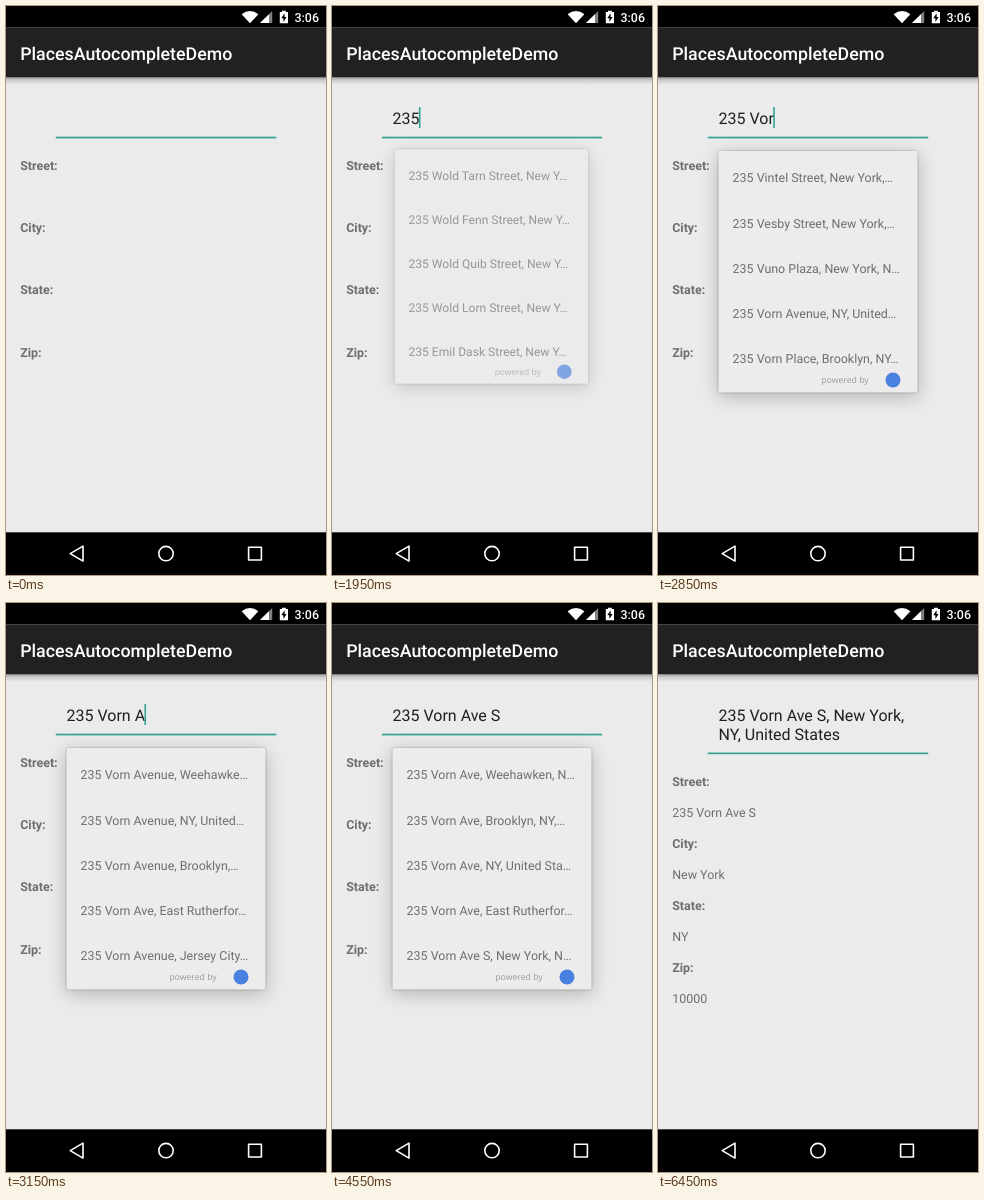
An HTML page for the animation above (6.5 s loop, 320 by 569 pixels).

```html
<!DOCTYPE html>
<html lang="en">
<head>
<meta charset="utf-8">
<title>Autocomplete demo</title>
<style>
  html, body { margin: 0; width: 100%; height: 100%; overflow: hidden; background: #ebebeb; }
  svg { display: block; width: 100vw; height: 100vh; }
  text {
    font-family: Roboto, sans-serif; font-size: 12.44px; fill: #6e6e6e;
    white-space: pre; text-rendering: geometricPrecision;
  }
  .title { font-size: 17.78px; font-weight: 500; fill: #fff; }
  .clock { font-weight: 500; fill: #fff; text-anchor: end; }
  .label { font-weight: 700; }
  .input { font-size: 16px; fill: #1f1f1f; }
  .credit { font-family: "Open Sans", sans-serif; font-size: 8.7px; fill: #9a9a9a; }
  .card { fill: #ececec; filter: drop-shadow(0 0 1px rgba(0,0,0,.3)) drop-shadow(0 4px 9px rgba(0,0,0,.24)); }
  .accent { fill: #34a393; }
  .nav { fill: none; stroke: #fff; stroke-width: 1.6; stroke-linejoin: round; }
</style>
</head>
<body>
<svg viewBox="0 0 320 569">
  <defs>
    <linearGradient id="shade" x2="0" y2="1">
      <stop offset="0" stop-opacity=".36"/>
      <stop offset=".4" stop-opacity=".13"/>
      <stop offset="1" stop-opacity="0"/>
    </linearGradient>
  </defs>
  <rect width="320" height="569" fill="#ebebeb"/>

  <rect y="71" width="320" height="8" fill="url(#shade)"/>
  <rect y="21.5" width="320" height="49.7" fill="#212121"/>
  <rect width="320" height="21.5"/>
  <text class="title" x="14.2" y="53.7">PlacesAutocompleteDemo</text>
  <g fill="#fff">
    <path d="M235.6 8.2Q244 1.8 252.4 8.2L244 17.2Z"/>
    <path d="M266.2 5V17H254Z" opacity=".5"/>
    <path d="M263 8.2V17H254Z"/>
    <path d="M276 6V4.8H279.8V6H282V17.2H273.8V6Z"/>
  </g>
  <path d="M278.6 7.2L275.3 12.2H277.4V16L280.6 11H278.6Z"/>
  <text class="clock" x="313" y="16">3:06</text>

  <g id="field">
    <text class="input" id="line1" x="60.5" y="118"></text>
    <text class="input" id="line2" x="60.5" y="136.7"></text>
    <rect class="accent" id="underline" x="49.8" width="220.4" height="1.7"/>
    <rect class="accent" id="cursor" width="1.6" height="21"/>
  </g>
  <g id="form"></g>

  <g id="popup">
    <rect class="card" x="60.5" y="145" width="199" height="241.5" rx="1.8"/>
    <g id="rows"></g>
    <text class="credit" x="163.3" y="377">powered by</text>
    <circle cx="235" cy="374" r="7.5" fill="#4a80e0"/>
  </g>

  <rect y="526.3" width="320" height="42.7"/>
  <g class="nav">
    <path d="M77 540.1V555.1L64.2 547.6Z"/>
    <circle cx="160" cy="547.6" r="7.2"/>
    <rect x="242.6" y="541.2" width="12.8" height="12.8"/>
  </g>
</svg>
<script>
const LOOP = 6500, STEP = 50, BLINK = 250;
const SHIFT = 18.8, LEFT = 60.5;
const QUERY = "235 Vorn Ave S";
const KEYS = [1450, 1600, 1750, 2150, 2250, 2650, 2850, 2950, 3000, 3050, 3450, 3500, 3600, 3650];
const FOCUS = 150, PICK = 4700, DETAILS = 5200;
const POP_IN = 1850, POP_IN_LEN = 150, POP_OUT_LEN = 150;

const LISTS = [
  [1850, ["Wold Tarn Street, New Y…", "Wold Fenn Street, New Y…", "Wold Quib Street, New Y…",
          "Wold Lorn Street, New Y…", "Emil Dask Street, New Y…"]],
  [2300, ["Vintel Street, New York,…", "Vesby Street, New York,…", "Vuno Plaza, New York, N…",
          "Vorn Avenue, NY, United…", "Vorn Place, Brooklyn, NY…"]],
  [3100, ["Vorn Avenue, Weehawke…", "Vorn Avenue, NY, United…", "Vorn Avenue, Brooklyn,…",
          "Vorn Ave, East Rutherfor…", "Vorn Avenue, Jersey City…"]],
  [3750, ["Vorn Ave, Weehawken, N…", "Vorn Ave, Brooklyn, NY,…", "Vorn Ave, NY, United Sta…",
          "Vorn Ave, East Rutherfor…", "Vorn Ave S, New York, N…"]]
];
const FORM = [["Street:", QUERY], ["City:", "New York"], ["State:", "NY"], ["Zip:", "10000"]];

const $ = id => document.getElementById(id);
const clamp = v => Math.min(1, Math.max(0, v));

function addText(parent, x, y, text, cls = "") {
  const el = document.createElementNS("http://www.w3.org/2000/svg", "text");
  el.setAttribute("x", x);
  el.setAttribute("y", y);
  el.setAttribute("class", cls);
  el.textContent = text;
  parent.append(el);
  return el;
}

function setText(el, text) {
  if (el.textContent !== text) el.textContent = text;
}

const values = FORM.map(([label, value], i) => {
  const y = 164 + i * 62.2;
  addText($("form"), 14.2, y, label, "label");
  return addText($("form"), 14.2, y + 31.1, value);
});
const rows = [0, 1, 2, 3, 4].map(i => addText($("rows"), 74.6, 176.4 + i * 45.25, ""));

function drawField(t) {
  const picked = t >= PICK;
  const typed = QUERY.slice(0, KEYS.filter(k => k <= t).length);
  setText($("line1"), picked ? QUERY + ", New York," : typed);
  setText($("line2"), picked ? "NY, United States" : "");
  $("underline").setAttribute("y", 130.7 + (picked ? SHIFT : 0));
  $("form").setAttribute("transform", `translate(0 ${picked ? SHIFT : 0})`);
  values.forEach(v => v.style.display = t >= DETAILS ? "" : "none");

  // Every edit restarts the blink
  const edit = Math.max(FOCUS, ...[...KEYS, PICK].filter(k => k <= t));
  const on = t >= edit && Math.floor((t - edit) / BLINK) % 2 === 0;
  const line = picked ? $("line2") : $("line1");
  const width = line.textContent ? line.getComputedTextLength() : 0;
  $("cursor").setAttribute("x", LEFT + width - 0.6);
  $("cursor").setAttribute("y", picked ? 120.5 : 101);
  $("cursor").style.display = on ? "" : "none";
}

function drawPopup(t) {
  const p = clamp((t - POP_IN) / POP_IN_LEN);
  const alpha = p * (1 - clamp((t - PICK) / POP_OUT_LEN));
  const popup = $("popup");
  popup.style.display = alpha > 0 ? "" : "none";
  popup.style.opacity = alpha;
  const s = 0.915 + 0.085 * p;
  popup.setAttribute("transform", `translate(140 80) scale(${s}) translate(-140 -80)`);
  const list = LISTS.filter(([start]) => start <= t).pop();
  if (list) list[1].forEach((text, i) => setText(rows[i], "235 " + text));
}

const start = performance.now();
function frame() {
  const t = Math.floor(((performance.now() - start) % LOOP) / STEP) * STEP;
  drawField(t);
  drawPopup(t);
  requestAnimationFrame(frame);
}
frame();
</script>
</body>
</html>
```
